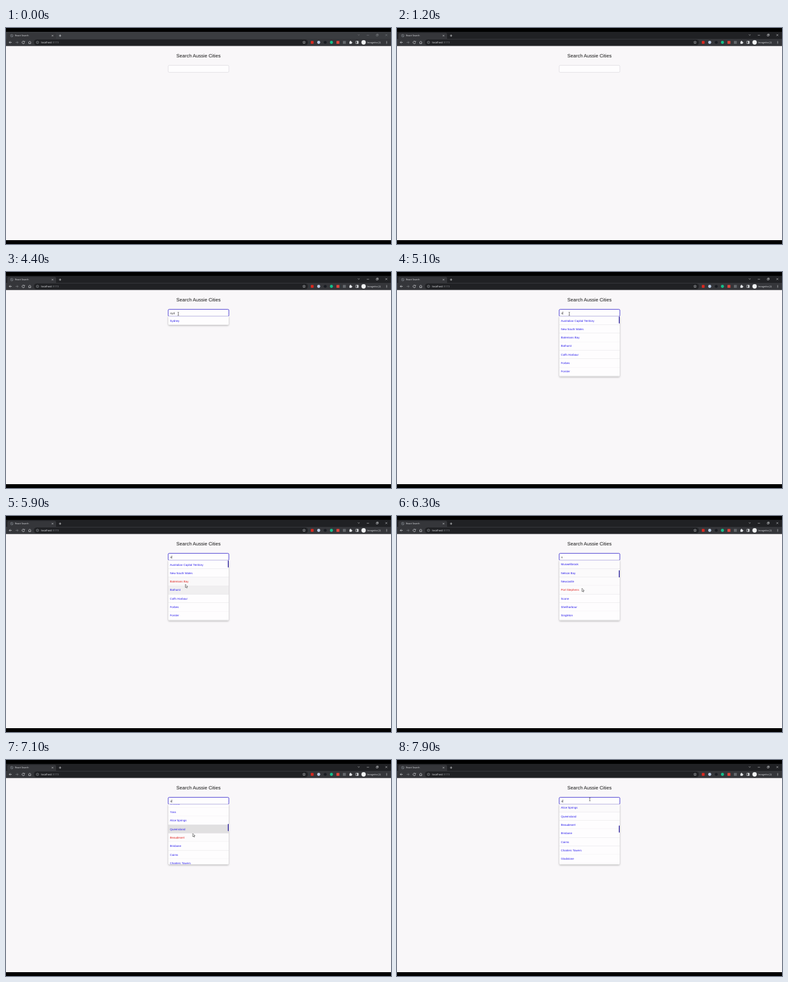
Animation of 600x338 px, one loop 8000 ms. Source, as an HTML page with a canvas:

```html
<!DOCTYPE html>
<html lang="en">
<head>
<meta charset="utf-8">
<title>City search</title>
<style>
  html, body { margin: 0; width: 100%; height: 100%; overflow: hidden; background: #000; }
  canvas { display: block; width: 600px; height: 338px; }
</style>
</head>
<body>
<canvas id="stage" width="600" height="338"></canvas>
<script>
const ctx = document.getElementById('stage').getContext('2d');
const LOOP = 8000;
const PAGE_FONT = '"Liberation Sans", Arial, sans-serif';
const UI_FONT = '"Open Sans", "Noto Sans", sans-serif';
const ROW = 13.333, TOTAL_ROWS = 60;
const LIST = { x: 253, y: 69.3, w: 94, h: 94.2 };
const CITIES = ('Australian Capital Territory,New South Wales,Batemans Bay,Bathurst,Coffs Harbour,Forbes,' +
  'Forster,Glen Innes,Gosford,Lismore,Muswellbrook,Nelson Bay,Newcastle,Port Stephens,Scone,' +
  'Shellharbour,Singleton,Sydney,West Wyalong,Windsor,Yass,Alice Springs,Queensland,Beaudesert,' +
  'Brisbane,Cairns,Charters Towers,Gladstone,Gold Coast').split(',');

// Keys are [time, ...values]
const MOUSE = [[1250, 310, 106], [1800, 268.5, 65.5], [5550, 268.5, 65.5], [5700, 222, 102],
  [5820, 262, 115], [5900, 279.5, 107], [6100, 280, 108], [6400, 291, 115],
  [7350, 291, 115], [7850, 300.5, 61.5]];
const SCROLL = [[6100, 0], [6450, 218.75], [6650, 218.75], [6770, 250], [7000, 250], [7250, 281.25]];
const TYPED = [[0, ''], [3100, 's'], [3250, 'sy'], [3450, 'syd'], [4600, 'sy'], [4880, 's']];
const CARET_RESETS = [2100, 3100, 3700, 4600, 4800];

const clamp = v => Math.max(0, Math.min(1, v));
const ramp = (t, from, to) => clamp((t - from) / (to - from));

function track(keys, t) {
  const i = keys.findIndex(k => k[0] > t);
  if (i === 0) return keys[0].slice(1);
  if (i < 0) return keys[keys.length - 1].slice(1);
  const a = keys[i - 1], b = keys[i];
  const p = ramp(t, a[0], b[0]), e = p * p * (3 - 2 * p);
  return a.slice(1).map((v, j) => v + (b[j + 1] - v) * e);
}

function rect(x, y, w, h, color, r = 0) {
  ctx.fillStyle = color;
  ctx.beginPath();
  ctx.roundRect(x, y, w, h, r);
  ctx.fill();
}

function disc(x, y, r, color) {
  ctx.fillStyle = color;
  ctx.beginPath();
  ctx.arc(x, y, r, 0, 7);
  ctx.fill();
}

function stroke(path, color, width = 0.6) {
  ctx.strokeStyle = color;
  ctx.lineWidth = width;
  ctx.stroke(new Path2D(path));
}

function text(str, x, y, size, color, font = PAGE_FONT, align = 'left') {
  ctx.font = `${size}px ${font}`;
  ctx.textRendering = 'geometricPrecision';
  ctx.textAlign = align;
  ctx.fillStyle = color;
  ctx.fillText(str, x, y);
}

function drawBrowser(active) {
  const light = '#e8eaed', controls = active ? light : '#85888c';
  rect(0, 6, 600, 11.5, active ? '#202124' : '#3a3c40');
  rect(2, 7.5, 76, 12, '#35363a', 2.5);
  rect(0, 17, 600, 11.3, '#35363a');

  stroke('M7 12a2 2 0 1 0 4 0a2 2 0 1 0-4 0M8 10.5l2 3', '#9aa0a6', 0.5);
  text('React Search', 14, 13.2, 3.6, light, UI_FONT);
  stroke('M71.3 10.8l2.4 2.4m0-2.4l-2.4 2.4', light, 0.5);
  stroke('M82.5 12h3.6m-1.8-1.8v3.6', light);
  stroke('M548.3 10.2l1.4 1.3l1.4-1.3', controls, 0.5);
  stroke('M562.3 11.3h3.4M577 10.3h2.3v2.3h-2.3zM577.8 10.3v-.8h2.3v2.3h-.8M591.3 9.7l2.8 2.8m0-2.8l-2.8 2.8', controls, 0.5);

  stroke('M9 22.5h-4m1.9-1.9l-1.9 1.9l1.9 1.9', light);
  stroke('M15 22.5h4m-1.9-1.9l1.9 1.9l-1.9 1.9', '#85888c');
  stroke('M28.4 21.2a2 2 0 1 0 .5 1.8M29 20.3v1.5h-1.6', light);
  stroke('M34.8 22.6l2.2-2l2.2 2M35.6 22.2v2.3h2.8v-2.3', light);

  rect(43.5, 18, 427, 9, '#202124', 4.5);
  stroke('M47.2 22.5a1.9 1.9 0 1 0 3.8 0a1.9 1.9 0 1 0-3.8 0M49.1 22.2v1.3M49.1 21.2v.5', '#bdc1c6', 0.45);
  text('localhost', 54.4, 23.9, 4.1, light, UI_FONT);
  const hostWidth = ctx.measureText('localhost').width;
  text(':5173', 54.4 + hostWidth, 23.9, 4.1, '#8b8f94', UI_FONT);
  stroke('M464.5 20.4l.6 1.4l1.5.1l-1.1 1l.3 1.5l-1.3-.8l-1.3.8l.3-1.5l-1.1-1l1.5-.1z', light, 0.45);

  rect(475, 20.3, 4.4, 4.4, '#d9281f', 0.8);
  disc(487.3, 22.5, 2.4, '#b9cbe4');
  disc(497.5, 22.5, 2.3, '#191c22');
  disc(507.2, 22.5, 2.4, '#14c08b');
  rect(515, 20.2, 4.6, 4.6, '#e0443a', 0.5);
  rect(525, 20.2, 4.6, 4.6, '#64686c', 0.5);
  rect(535.2, 21.2, 3.5, 3.5, light, 0.5);
  disc(536.9, 21, 0.9, light);
  disc(538.8, 22.8, 0.9, light);
  stroke('M545.2 20.6h3.8v3.8h-3.8z', light);
  rect(547.2, 20.6, 1.8, 3.8, light);
  disc(557.3, 22.5, 3.4, '#f1f3f4');
  text('Incognito (2)', 562.8, 23.8, 3.65, light, UI_FONT);
  for (const y of [20.9, 22.5, 24.1]) disc(593.2, y, 0.5, light);
}

function drawInput(t) {
  const focus = ramp(t, 1980, 2300);
  const mix = (a, b) => a + (b - a) * focus;
  rect(252.8, 58.4, 94.5, 11, '#fefdfe', 1.6);
  ctx.strokeStyle = `rgb(${mix(214, 82)},${mix(212, 68)},${mix(216, 212)})`;
  ctx.lineWidth = mix(0.6, 0.95);
  ctx.stroke();

  const typed = TYPED.filter(k => k[0] <= t).pop()[1];
  text(typed, 256, 65.7, 4.4, '#222');
  const reset = CARET_RESETS.filter(r => r <= t).pop();
  if (reset !== undefined && (t - reset) % 1000 < 500)
    rect(256 + ctx.measureText(typed).width, 62, 0.5, 4.6, '#222');
}

function hoveredRow(t) {
  const [x, y] = track(MOUSE, t);
  if (t < 5100 || x < LIST.x || x > LIST.x + LIST.w || y < LIST.y) return -1;
  return Math.floor((y - LIST.y + track(SCROLL, t)[0]) / ROW);
}

// Share of the last 200 ms spent over each row: a linear background fade
function hoverLevels(t) {
  const levels = {}, samples = 20;
  for (let i = 0; i < samples; i++) {
    const row = hoveredRow(t - i * 10);
    levels[row] = (levels[row] || 0) + 1 / samples;
  }
  return levels;
}

function drawList(t) {
  if (t < 3550) return;
  const full = t >= 5100, rows = full ? CITIES : ['Sydney'];
  const height = full ? LIST.h : ROW, scroll = track(SCROLL, t)[0];
  const hovered = hoveredRow(t), levels = hoverLevels(t);

  ctx.save();
  ctx.globalAlpha = ramp(t, 3500, 3650);
  ctx.shadowColor = 'rgba(0,0,0,.3)';
  ctx.shadowBlur = 3;
  ctx.shadowOffsetY = 1;
  rect(LIST.x, LIST.y, LIST.w, height, '#fefdfe', [0, 0, 1.5, 1.5]);
  ctx.shadowColor = 'transparent';
  ctx.clip();
  rows.forEach((name, i) => {
    const y = LIST.y + i * ROW - scroll;
    if (y < LIST.y - ROW || y > LIST.y + height) return;
    if (levels[i]) rect(LIST.x, y, LIST.w, ROW, `rgba(0,0,0,${0.12 * levels[i]})`);
    if (full) rect(LIST.x, y + ROW - 0.4, LIST.w, 0.4, '#e6e4e8');
    text(name, 255.5, y + 8.2, 4.45, i === hovered ? '#e0201c' : '#2a1cec');
  });
  if (full) {
    const scale = LIST.h / (TOTAL_ROWS * ROW);
    rect(345.8, LIST.y + scroll * scale, 1.2, LIST.h * scale, '#24189c', 0.5);
  }
  ctx.restore();
}

function drawPointer(t) {
  if (t < 1250 || (t >= 3100 && t < 4300)) return;
  const [x, y] = track(MOUSE, t);
  const overInput = x > 252.5 && x < 347.5 && y > 58 && y < LIST.y;
  ctx.save();
  ctx.translate(x, y);
  if (overInput) {
    stroke('M-1.1-2.4h2.2M0-2.4v4.8M-1.1 2.4h2.2', '#333', 0.55);
  } else {
    const arrow = 'M0 0v5l1.2-1.1l.8 1.8l.9-.4l-.8-1.8h1.6z';
    ctx.fillStyle = '#fff';
    ctx.fill(new Path2D(arrow));
    stroke(arrow, '#222', 0.5);
  }
  ctx.restore();
}

function draw(t) {
  rect(0, 0, 600, 338, '#000');
  rect(0, 28, 600, 304, '#f9f7f9');
  drawBrowser(t >= 1200);
  text('Search Aussie Cities', 300, 46, 7.5, '#151515', PAGE_FONT, 'center');
  drawInput(t);
  drawList(t);
  drawPointer(t);
}

const start = performance.now();
function tick() {
  draw((performance.now() - start) % LOOP);
  requestAnimationFrame(tick);
}
tick();
</script>
</body>
</html>
```
